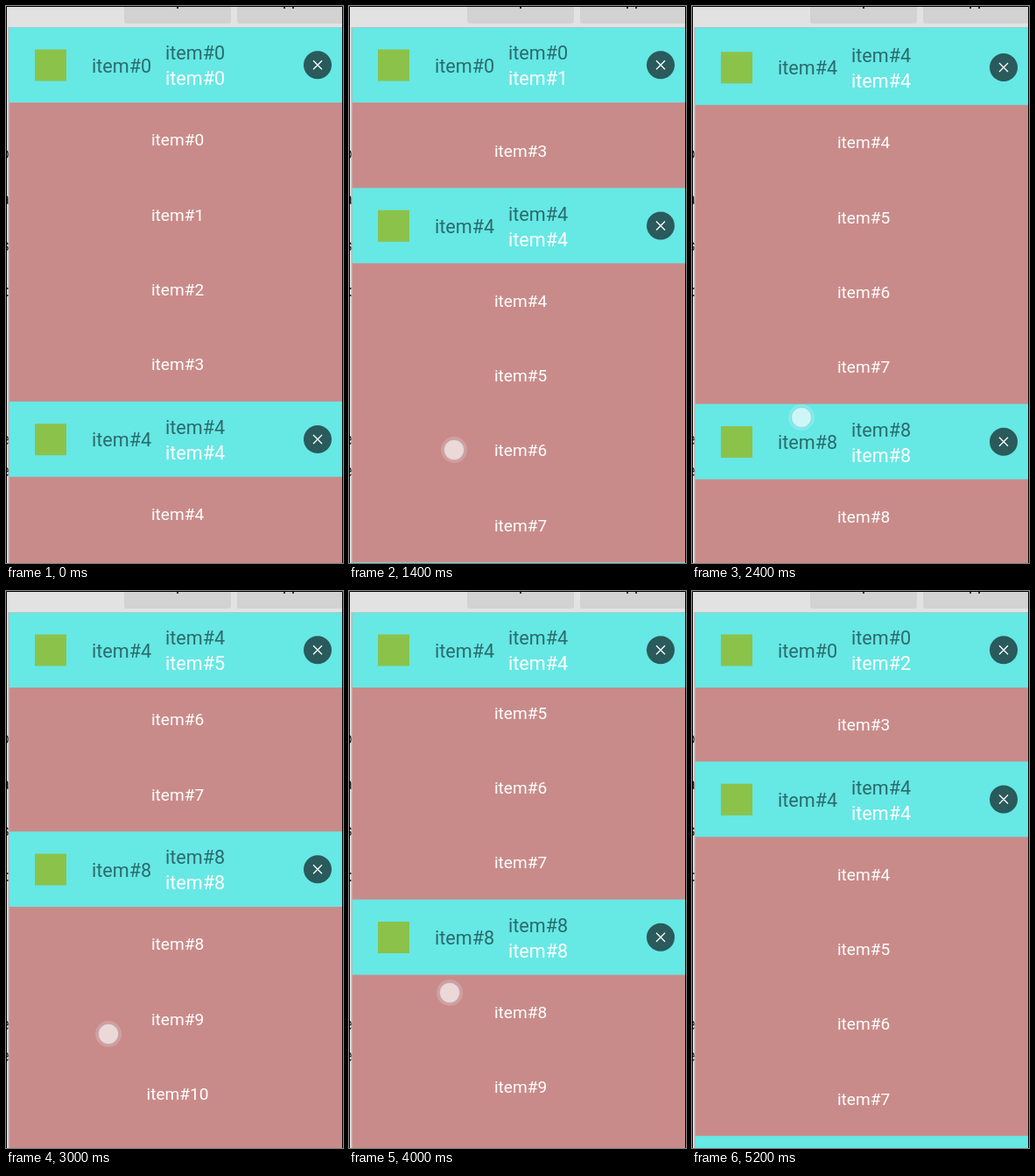
Write an HTML page that moves like this. It is 385 px wide and 635 px high and loops after 5800 ms.

```html
<!DOCTYPE html>
<html lang="en">
<head>
<meta charset="utf-8">
<title>Sticky header list</title>
<style>
  html, body { margin: 0; width: 100%; height: 100%; overflow: hidden; background: #e2e2e2; }
  svg { display: block; width: 385px; height: 635px; }
  text { font-family: Roboto, "Open Sans", sans-serif; }
  .head text { font-size: 21.6px; fill: #2c6b6b; }
  .head .sub { fill: #fff; }
  .item { font-size: 19.1px; fill: #fff; text-anchor: middle; }
  .page { font-size: 18px; fill: #111; }
</style>
</head>
<body>
<svg viewBox="0 0 385 635">
  <clipPath id="pane"><rect x="3.5" y="24.5" width="381" height="611"/></clipPath>
  <rect width="385" height="635" fill="#e2e2e2"/>
  <g id="page"></g>
  <rect x="2.5" y="24" width="1" height="611" fill="#b8b8b8"/>
  <g fill="#d2d2d2">
    <rect x="135" y="-6" width="122" height="26" rx="3"/>
    <rect x="264" y="-6" width="130" height="26" rx="3"/>
  </g>
  <g class="page">
    <text x="194" y="-1">p</text>
    <text x="316" y="-1">pp</text>
  </g>
  <g clip-path="url(#pane)">
    <rect y="24" width="385" height="611" fill="#c98b89"/>
    <g id="list"></g>
    <g id="sticky"></g>
    <g id="touch" fill="#fff">
      <circle r="15" fill-opacity=".17"/>
      <circle r="11.5" fill-opacity=".6" stroke="#7d93be" stroke-opacity=".35"/>
    </g>
  </g>
  <path d="M.5 635V.5H384.5V635" fill="none" stroke="#000"/>
</svg>
<script>
const LOOP = 5800, STEP = 100, HOLD = 200;
const TOP = 24.5, ROW = 85.35, GROUP = 5, ROWS = 18;

// Key poses; x and y place the finger, which drags the list one to one
const POSES = [
  { t: 500, s: 0 },
  { t: 800, s: 70, x: 119, y: 536 },
  { t: 1400, s: 243.5, x: 120, y: 506 },
  { t: 2400, s: 424, x: 125, y: 469 },
  { t: 3000, s: 603.5, x: 117, y: 505 },
  { t: 3400, s: 670 },
  { t: 4000, s: 526, x: 115, y: 458 },
  { t: 4600, s: 350, x: 115, y: 476 },
  { t: 5200, s: 256.5 }
];

const $ = id => document.getElementById(id);
const place = (el, x, y) => el.setAttribute('transform', `translate(${x} ${y})`);

function add(parent, tag, attrs, text = '') {
  const el = document.createElementNS('http://www.w3.org/2000/svg', tag);
  for (const k in attrs) el.setAttribute(k, attrs[k]);
  el.textContent = text;
  return parent.appendChild(el);
}

function itemName(row) {
  const group = Math.floor(row / GROUP);
  return 'item#' + (group * 4 + Math.max(0, row % GROUP - 1));
}

function addHeader(parent, name) {
  const g = add(parent, 'g', { class: 'head' });
  add(g, 'rect', { x: 3.5, y: -.3, width: 381, height: ROW + .5, fill: '#66e8e5' });
  add(g, 'rect', { x: 33, y: 25, width: 36, height: 36, fill: '#8bc34a' });
  const title = add(g, 'text', { x: 98, y: 51.2 }, name);
  const upper = add(g, 'text', { x: 182, y: 36.9 }, name);
  const sub = add(g, 'text', { x: 182, y: 65.9, class: 'sub' }, name);
  add(g, 'circle', { cx: 356, cy: 42.7, r: 16, fill: '#2a5a5b' });
  add(g, 'path', { d: 'M351 37.7l10 10m0-10l-10 10', stroke: '#fff', 'stroke-width': 1.3 });
  return { g, title, upper, sub };
}

// Clipped letters of the page behind the pane
function addPageText(chars, y, gap) {
  [...chars].forEach((c, i) =>
    add($('page'), 'text', { x: 4, y: y + i * gap, class: 'page', 'text-anchor': 'end' }, c));
}
addPageText('oas:', 174, 52.4);
addPageText('ee', 500, 36);

for (let r = 0; r < ROWS; r++) {
  const g = add($('list'), 'g', {});
  place(g, 0, r * ROW);
  if (r % GROUP) add(g, 'text', { x: 196, y: 49.6, class: 'item' }, itemName(r));
  else addHeader(g, itemName(r));
}
const sticky = addHeader($('sticky'), 'item#0');

// Scroll speed at a pose, from its neighbours; at rest at both ends
function speed(i) {
  const a = POSES[i - 1], b = POSES[i + 1];
  return a && b ? (b.s - a.s) / (b.t - a.t) : 0;
}

// Cubic Hermite curve through the poses
function scrollAt(t) {
  const j = POSES.findIndex(p => p.t > t);
  if (j === 0) return 0;
  if (j < 0) return POSES.at(-1).s;
  const a = POSES[j - 1], b = POSES[j], d = b.t - a.t, p = (t - a.t) / d, q = 1 - p;
  return q * q * (1 + 2 * p) * a.s + p * p * (1 + 2 * q) * b.s
    + d * p * q * (q * speed(j - 1) - p * speed(j));
}

function draw(t) {
  const s = scrollAt(t);
  place($('list'), 0, TOP - s);

  const row = Math.floor(s / ROW);
  const group = Math.floor(row / GROUP);
  const next = (group + 1) * GROUP * ROW - s;
  place(sticky.g, 0, TOP + Math.min(0, next - ROW));
  sticky.title.textContent = sticky.upper.textContent = itemName(group * GROUP);
  sticky.sub.textContent = itemName(row);

  const drag = POSES.find(p => p.x && Math.abs(t - p.t) <= HOLD);
  $('touch').style.display = drag ? '' : 'none';
  if (drag) place($('touch'), drag.x, drag.y + drag.s - s);
}

const start = performance.now();
function tick() {
  const t = (performance.now() - start) % LOOP;
  draw(Math.floor(t / STEP) * STEP);
  requestAnimationFrame(tick);
}
tick();
</script>
</body>
</html>
```
